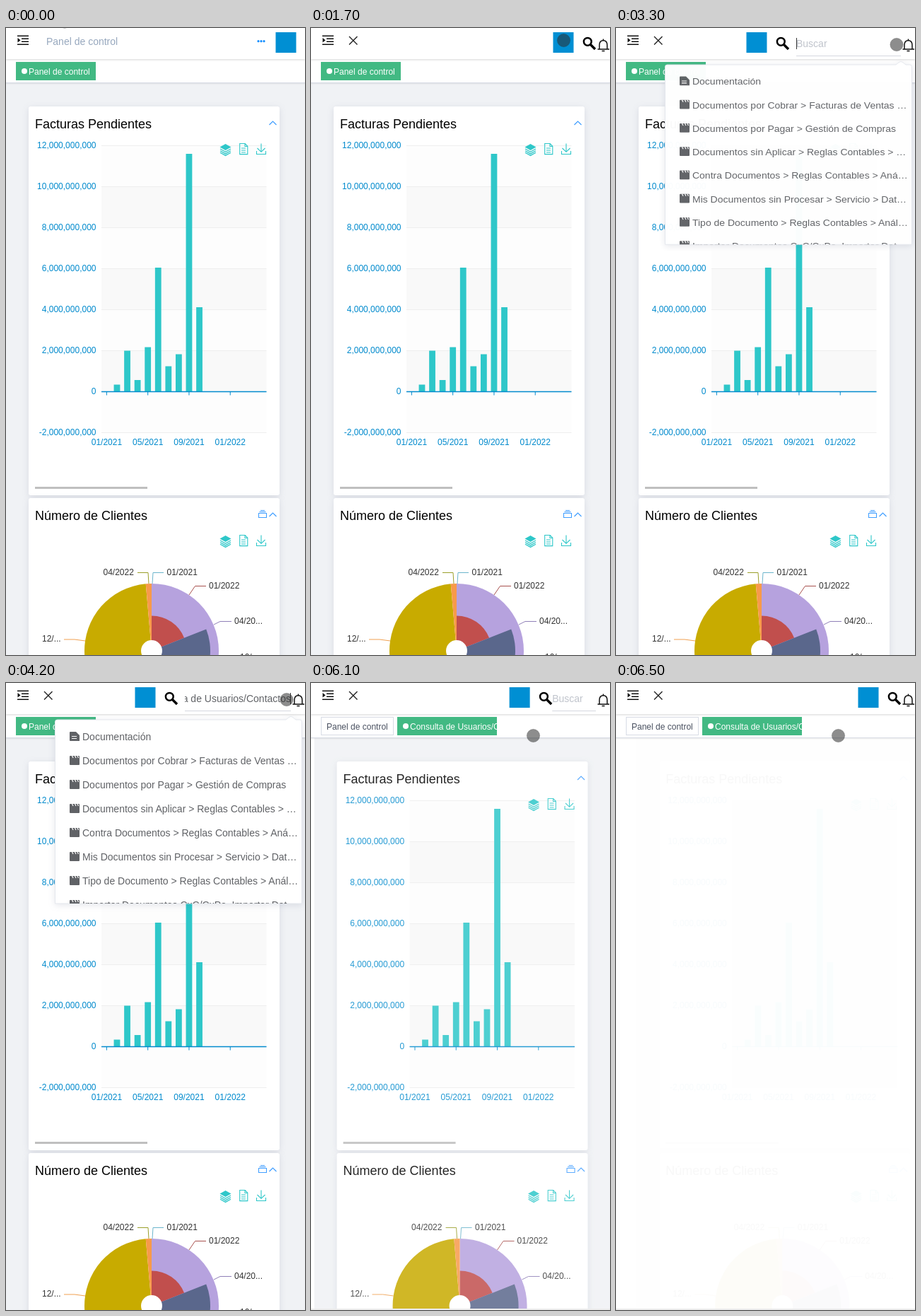
Write an HTML page that moves like this. It is 423 by 887 pixels and loops after 8 s.

```html
<!DOCTYPE html>
<html lang="es">
<head>
<meta charset="utf-8">
<style>
html, body { margin: 0; width: 100%; height: 100%; overflow: hidden; background: #fff; }
svg { display: block; font: 14px "Liberation Sans", Arial, sans-serif; }
.line { fill: none; }
.shadow { filter: drop-shadow(0 2px 5px rgba(60, 70, 110, .13)); }
.bar { filter: drop-shadow(0 1px 1.5px rgba(0, 0, 0, .16)); }
</style>
</head>
<body>
<svg id="stage" width="423" height="887" viewBox="0 0 423 887"></svg>
<script>
const BLUE = '#008acd', TEAL = '#2ec7c9', GREY = '#606266', QUERY = 'Consulta de Usuarios/Contactos';

const rect = (x, y, w, h, fill, more = '') =>
  `<rect x="${x}" y="${y}" width="${w}" height="${h}" fill="${fill}" ${more}/>`;
const text = (x, y, str, size, fill, more = '') =>
  `<text x="${x}" y="${y}" font-size="${size}" fill="${fill}" ${more}>${str.replace(/>/g, '&gt;')}</text>`;
const line = (d, stroke, width = 1) => `<path class="line" d="${d}" stroke="${stroke}" stroke-width="${width}"/>`;
const dot = (x, y, r, fill) => `<circle cx="${x}" cy="${y}" r="${r}" fill="${fill}"/>`;
const group = (id, body, more = '') => `<g id="${id}" ${more}>${body}</g>`;
const range = (n, fn) => Array.from({ length: n }, (_, i) => fn(i)).join('');

function toolbox(y) {
  return `<g transform="translate(0 ${y})">` +
    line('M372.5 -34l5-5 5 5', '#409eff', 1.2) +
    `<path d="M302.5-2.5l8-4.5 8 4.5-8 4.5z" fill="${TEAL}"/>` +
    line('M303 0l7.5 4.2 7.5-4.2M303 2.7l7.5 4.2 7.5-4.2M303 5.2l7.5 4.2 7.5-4.2', TEAL, 1.3) +
    line('M330.7-7.5h7.5l3.6 3.8V7.6h-11.1zM338-7.5v4h3.8M333-1h6M333 2h6M333 5h6', TEAL, 1.1) +
    line('M361-7.500V4M355.500-1L361 4.300 366.500-1M354.500 3v4.500h13V3', TEAL, 1.1) + '</g>';
}

function barChart() {
  const tops = [504.5, 456.5, 498, 451.5, 339, 478.5, 461.5, 178, 395];
  const x = i => 142.4 + 14.57 * i, y = i => 166.5 + 58 * i;
  return range(7, i => rect(135, y(i), 233.5, 58, i % 2 ? '#f9f9f9' : '#fdfdfd')) +
    range(8, i => line(`M135 ${y(i)}h233.500`, '#eee') +
      text(127.5, y(i) + 3, ((12 - 2 * i) * 1e9).toLocaleString('en-US'), 12, BLUE, 'text-anchor="end"')) +
    tops.map((top, i) => rect(x(i + 1) - 4.4, top, 8.8, 514 - top, TEAL)).join('') +
    line('M135 514.500h233.500', BLUE, 1.3) +
    ['01/2021', '05/2021', '09/2021', '01/2022'].map((label, i) =>
      line(`M${x(4 * i)} 514v5.500`, BLUE) +
      text(x(4 * i), 590, label, 12, BLUE, 'text-anchor="middle"')).join('');
}

function pieChart() {
  const cx = 206, cy = 881;
  const at = (deg, r) => {
    const a = deg * Math.PI / 180;
    return `${cx + r * Math.sin(a)} ${cy - r * Math.cos(a)}`;
  };
  const slice = (from, to, r, fill) =>
    `<path d="M${cx} ${cy}L${at(from, r)}A${r} ${r} 0 0 1 ${at(to, r)}z" fill="${fill}"/>`;
  const label = (x, y, str, d, color) => text(x, y, str, 12, '#333') + line(d, color);
  return slice(0, 180, 95, '#b6a2de') + slice(0, 68.5, 49.500, '#c14f4d') + slice(68.5, 180, 83, '#5a678c') +
    slice(180, 355, 95, '#c8ab00') + slice(355, 360, 95, '#f79a4a') + dot(cx, cy, 15, '#fff') +
    label(137.5, 774, '04/2022', 'M186 770.500h15L202 786', '#9a9f2a') +
    label(227.5, 774, '01/2021', 'M223 770.500h-15L207 786', '#6bb5cc') +
    label(287, 793, '01/2022', 'M283 789.500h-15.500L259 802', '#a8504d') +
    label(323, 843, '04/20...', 'M319 839.500h-16L294 844', '#9080b8') +
    label(51, 868, '12/...', 'M82 865h15L112 867', '#f0a050') +
    text(331, 894, '10/...', 12, '#333');
}

const card = (y, h) => rect(32, y, 355, h, '#fff', 'rx="3" class="shadow"');

const page = rect(0, 78, 423, 809, '#f0f2f5') +
  card(111, 550) + text(41, 142, 'Facturas Pendientes', 18, '#000') +
  barChart() + toolbox(171) + rect(41, 649, 159, 3, '#bfbfbf') +
  card(665, 240) + text(41, 696, 'Número de Clientes', 18, '#000') + toolbox(725) +
  line('M357.500 686.500h11v6h-11zM358.500 684.500h9M360 682.500h6', '#409eff', 1.1) + pieChart();

const activeTab = (x, w, label) =>
  `<svg x="${x}" y="48" width="${w}" height="26">` + rect(0, 0, w, 26, '#42b983') +
  dot(12, 13, 4, '#fff') + text(18, 18, label, 12, '#fff') + '</svg>';

const lens = line('M4.500 4.500L10 10', GREY, 2.4) + `<circle r="5" class="line" stroke="${GREY}" stroke-width="2"/>`;
const folder = i => i
  ? rect(90, 69 + 34 * i, 14, 13, GREY, 'rx="1"') +
    line(`M93.500 ${69 + 34 * i}l1.500 3M97.500 ${69 + 34 * i}l1.500 3M101 ${69 + 34 * i}l1.500 3`, '#fff', 1.2)
  : `<path d="M91 69h8l5 5v8H91q-1 0-1-1V70q0-1 1-1z" fill="${GREY}"/>` +
    line('M93 75.500h7M93 78.500h7', '#fff', 1.2);
const searchRow = i => `<g transform="translate(95.500 ${74.5 + 34 * i})">${lens}</g>`;

function menu(id, bottom, arrowX, icon, rows) {
  return group(id,
    `<g class="shadow"><path d="M69.500 55q0-3 3-3H${arrowX - 7}l5-4q2-1 4 0l5 4H416q2.500 0 2.500 3V${bottom}H69.500z" fill="#fff" stroke="#e4e7ed"/></g>` +
    `<svg width="423" height="${bottom}">` +
    rows.map((row, i) => icon(i) + text(108, 81 + 34 * i, row, 14, GREY)).join('') + '</svg>');
}

stage.innerHTML =
  group('page', page) +
  rect(0, 44, 423, 33, '#fff', 'class="bar"') + line('M0 77.500h423', '#d8dce5') +
  group('tabHome', activeTab(14, 113, 'Panel de control')) +
  group('tabsBoth', rect(14.5, 48.5, 102, 25, '#fff', 'stroke="#d8dce5"') +
    text(22, 66, 'Panel de control', 12, '#495060') + activeTab(122, 141, QUERY) +
    rect(0, 885, 423, 2, '#ececec')) +
  rect(0, 0, 423, 44, '#fff', 'class="bar"') +
  line('M16 11.200h16M22 15.200h10M22 19.200h10M16 23.300h16', '#111', 1.6) +
  '<path d="M16.500 14l4 3.200-4 3.200z" fill="#111"/>' +
  group('collapsed', text(57, 24, 'Panel de control', 14, '#97a8be') +
    [357, 361, 365].map(x => dot(x, 18.7, 1.6, '#1890ff')).join('')) +
  group('expanded', line('M54 12l11.500 11.500M65.500 12L54 23.500', '#222', 1.4) +
    line('M405.500 30h16.500M408 30v-6q0-6 5.500-6.500 5.500.5 5.500 6.500v6M413.500 15.500v2M411.500 32.500h4', '#111', 1.5) +
    group('lens', line('M395.500 23.500L402 30', '#000', 3.4) +
      '<circle cx="391.300" cy="19.300" r="5.400" class="line" stroke="#000" stroke-width="2.500"/>') +
    '<svg id="field" y="10" height="30">' + rect(0, 29, 150, 1, '#d5d8df') +
    text(0, 17, 'Buscar', 14, '#c0c4cc', 'id="hint"') +
    text(150, 17, QUERY, 14, GREY, 'id="query" text-anchor="end"') + rect(0, 4, 1, 16, '#333', 'id="caret"') + '</svg>') +
  group('logo', rect(-14.5, 6, 29, 29, '#008fd3')) +
  menu('recent', 312, 403, folder, ['Documentación',
    'Documentos por Cobrar > Facturas de Ventas …', 'Documentos por Pagar > Gestión de Compras',
    'Documentos sin Aplicar > Reglas Contables > …', 'Contra Documentos > Reglas Contables > Aná…',
    'Mis Documentos sin Procesar > Servicio > Dat…', 'Tipo de Documento > Reglas Contables > Anál…',
    'Importar Documentos CxC/CxPo, Importar Dat…']) +
  menu('results', 220, 295, searchRow, [QUERY + ' > Seguridad …',
    'Consulta de Conductores > Gestión de Flota d…', 'Consulta de mis solicitantes > Gestión del Rec…',
    'Consulta de suministros del MRP > MRP > Ge…', 'Consulta de conceptos globales de Nómina > …']) +
  '<circle id="cursor" r="9.200" fill="rgba(45,45,45,.54)" stroke="rgba(45,45,45,.2)"/>';

const $ = id => document.getElementById(id);
const set = (id, attrs) => Object.entries(attrs).forEach(([key, value]) => $(id).setAttribute(key, value));
const show = (id, on) => { $(id).style.display = on ? '' : 'none'; };
const progress = (t, start, length) => Math.min(1, Math.max(0, (t - start) / length));

// CSS "ease", cubic-bezier(.25, .1, .25, 1)
function ease(p) {
  let lo = 0, hi = 1, s;
  for (let i = 0; i < 24; i++) {
    s = (lo + hi) / 2;
    if (.75 * s * (1 - s) + s ** 3 < p) lo = s; else hi = s;
  }
  return .3 * s * (1 - s) ** 2 + 3 * (1 - s) * s * s + s ** 3;
}

// [time, x, y]
const path = [[200, 83, -9], [300, 105, 55], [400, 150, 132], [500, 158, 144], [600, 158, 144],
  [700, 270, 65], [800, 342, 25], [900, 342, 25], [1000, 338, 24], [1500, 357.5, 17.5], [2100, 357.5, 17.5],
  [2300, 411, 30], [2700, 411, 30], [2800, 397, 23.5], [5100, 397, 23.5], [5700, 314.5, 74.5]];

function cursorAt(t) {
  const next = path.findIndex(key => key[0] > t);
  if (next <= 0) return path.at(next).slice(1);
  const [t0, x0, y0] = path[next - 1], [t1, x1, y1] = path[next];
  const p = (t - t0) / (t1 - t0), k = p * p * (3 - 2 * p);
  return [x0 + (x1 - x0) * k, y0 + (y1 - y0) * k];
}

function render(t) {
  const expanded = t >= 1700, searching = t >= 3200 && t < 6100, left = t >= 6100;
  const typed = t >= 4200 && searching;
  const width = 150 * (left ? 1 - ease(progress(t, 6032, 200)) : ease(progress(t, 3130, 200)));
  const shift = -width - (searching ? 10 : 0);

  show('collapsed', !expanded);
  show('expanded', expanded);
  show('tabHome', !left);
  show('tabsBoth', left);
  set('logo', { transform: `translate(${expanded ? 357 + shift : 396} 0)` });
  set('lens', { transform: `translate(${shift} 0)` });
  set('field', { x: 403 - width, width });
  show('field', width > .5);
  show('hint', !typed);
  show('query', typed);
  show('caret', searching && (t - 3200) % 1000 < 500);
  set('caret', { x: typed ? 149 : 0 });

  const grow = 1 - (1 - progress(t, 3140, 300)) ** 5;
  show('recent', t >= 3200 && t < 4700);
  set('recent', { transform: `translate(0 ${52 * (1 - grow)}) scale(1 ${grow})`, opacity: grow });
  show('results', t >= 4700 && searching);

  const leave = left ? ease(progress(Math.min(t, 6500), 6020, 600)) : 0;
  set('page', { transform: `translate(${30 * leave} 0)`, opacity: 1 - leave });

  const [cx, cy] = cursorAt(t);
  set('cursor', { cx, cy });
}

// The screen refreshes ten times a second.
function tick() {
  render(Math.floor(performance.now() % 8000 / 100) * 100);
  requestAnimationFrame(tick);
}
tick();
</script>
</body>
</html>
```
